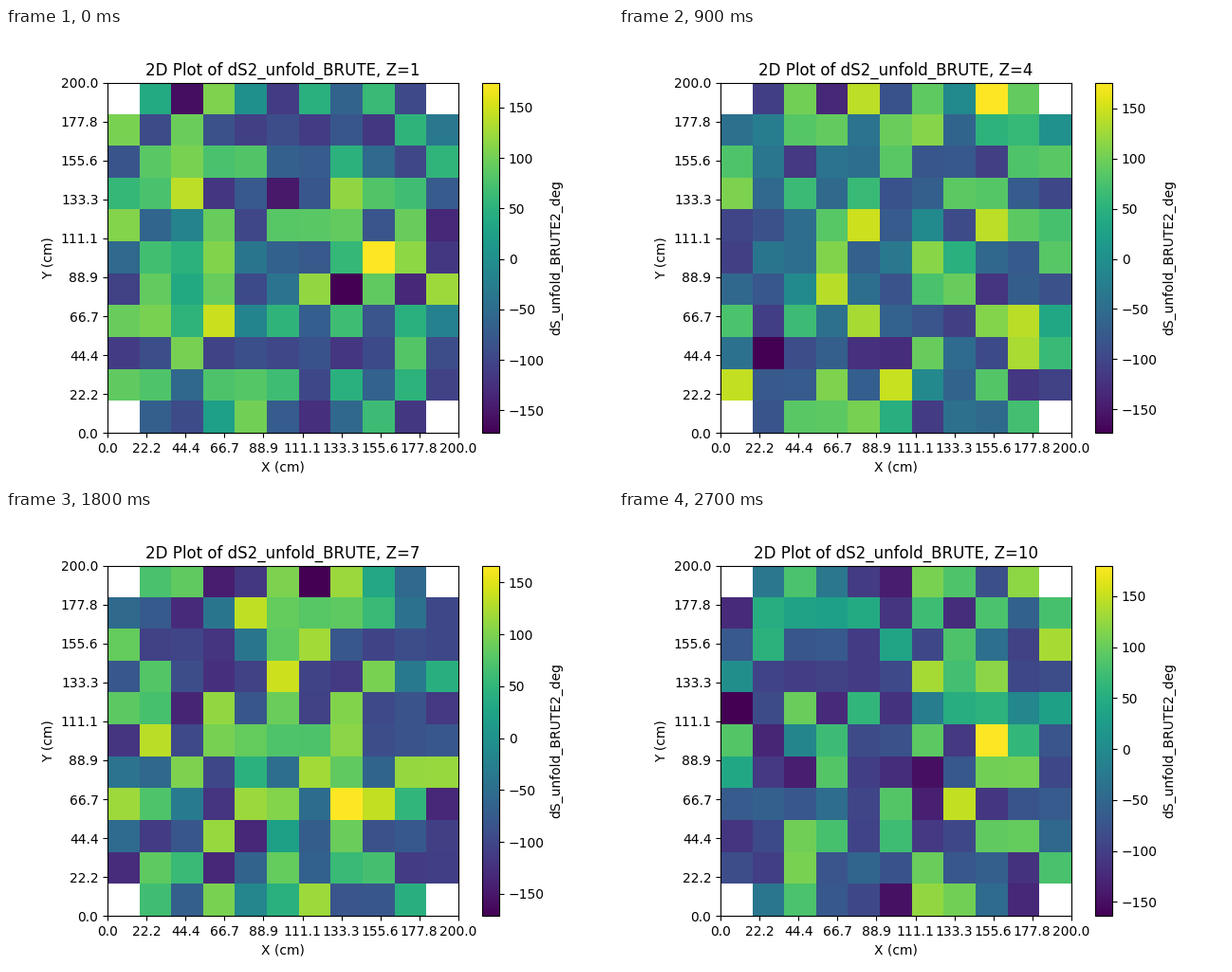
A matplotlib script for the animation above (3000 ms loop, 640x480 px).

```python
import numpy as np
import matplotlib.pyplot as plt
from matplotlib.animation import FuncAnimation

CELLS = 11
SIZE_CM = 200

# Lowest and highest angle of each layer, which set its colour scale
LOWS = [-172.3, -174, -175.2, -173.8, -175, -178.2, -171.2, -178.6, -176, -163.7]
HIGHS = [174.7, 172, 154.8, 175.9, 174, 176.2, 166.3, 176.8, 175, 179.9]


def layer_angles(index):
    """Two clusters of angles, negative and positive, with empty corners."""
    low, high = LOWS[index], HIGHS[index]
    rng = np.random.default_rng(index + 1)
    shape = (CELLS, CELLS)
    centre = np.where(rng.random(shape) < 0.53, -80, 88)
    angles = np.clip(rng.normal(centre, 32), low, high)
    angles[::CELLS - 1, ::CELLS - 1] = np.nan
    angles.flat[np.nanargmin(angles)] = low
    angles.flat[np.nanargmax(angles)] = high
    return angles


plt.rcParams["font.family"] = "DejaVu Sans"
fig, ax = plt.subplots(figsize=(6.4, 4.8), dpi=100)
image = ax.imshow(layer_angles(0), cmap="viridis", interpolation="nearest",
                  extent=(0, SIZE_CM, 0, SIZE_CM))
fig.colorbar(image, ax=ax, label="dS_unfold_BRUTE2_deg")

ticks = np.linspace(0, SIZE_CM, 10)
labels = [f"{tick:.1f}" for tick in ticks]
ax.set_xticks(ticks, labels)
ax.set_yticks(ticks, labels)
ax.set_xlabel("X (cm)")
ax.set_ylabel("Y (cm)")
title = ax.set_title("")


def update(index):
    image.set_data(layer_angles(index))
    image.set_clim(LOWS[index], HIGHS[index])
    title.set_text(f"2D Plot of dS2_unfold_BRUTE, Z={index + 1}")
    return image, title


animation = FuncAnimation(fig, update, frames=len(LOWS), interval=300,
                          repeat=True, repeat_delay=0, blit=False)
plt.show()
```
